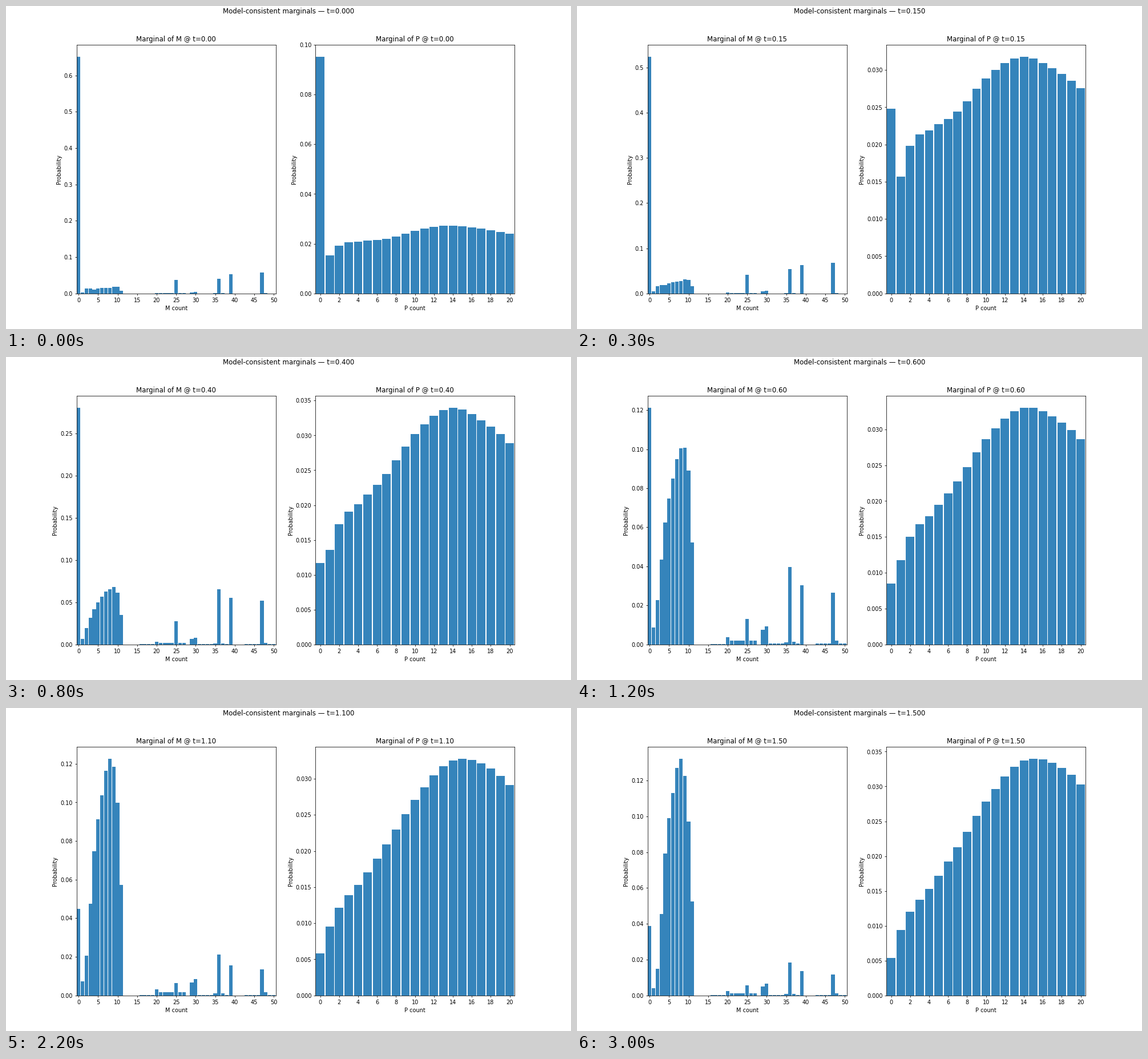
Write a matplotlib script that moves like this. It is 990 px wide and 566 px high and loops after 3100 ms.

```python
import numpy as np
import matplotlib.pyplot as plt
from matplotlib.animation import FuncAnimation

FRAMES, INTERVAL, DT = 31, 100, 0.05

# Time courses, given at a few moments of model time
TIMES = np.array([0, 0.15, 0.4, 0.6, 0.8, 1.1, 1.5])
EMPTY = (0.652, 0.524, 0.2804, 0.1213, 0.0621, 0.045, 0.0388)
SPIKE = (0.0525, 0.0632, 0.0553, 0.0302, 0.0197, 0.0157, 0.0135)
RISE = (0, 0.1, 0.42, 0.71, 0.83, 0.905, 1)
SWELL = (0, 0.25, 0.65, 1, 1, 0.7, 0)
GROWTH = (0.4, 0.57, 0.83, 0.98, 1, 0.89, 0.68)
LEVEL = (1, 1.067, 1, 0.975, 0.955, 0.965, 1)

# Curves over the counts, in 1e-4, given at a few knots
M_KNOTS = (1, 2, 4, 6, 8, 10, 11)
M_EARLY = (35, 133, 112, 158, 147, 190, 79)
M_LATE = (40, 149, 791, 1129, 1322, 971, 525)
P_KNOTS = (1, 2, 4, 7, 10, 14, 17, 20)
P_EARLY = (154, 193, 208, 219, 252, 273, 260, 240)
P_MID = (136, 173, 201, 245, 302, 340, 322, 289)
P_LATE = (94, 120, 153, 213, 278, 337, 334, 303)

# Spike sizes relative to SPIKE: first and settled
SPIKES = {25: (0.7, 0.41), 36: (0.77, 1.36), 39: (1, 1), 47: (1.1, 0.86)}


def smooth(x, knots, values):
    """Cubic Hermite curve through the knots."""
    knots, values = np.asarray(knots, float), np.asarray(values, float)
    h = np.diff(knots)
    d = np.diff(values) / h
    slope = np.empty_like(values)
    slope[1:-1] = (d[:-1] * h[1:] + d[1:] * h[:-1]) / (h[:-1] + h[1:])
    slope[0] = 2 * d[0] - slope[1]
    slope[-1] = 2 * d[-1] - slope[-2]
    i = np.clip(np.searchsorted(knots, x, side="right") - 1, 0, len(h) - 1)
    u = (x - knots[i]) / h[i]
    bend = (1 - u) * (slope[i] - d[i]) - u * (slope[i + 1] - d[i])
    return values[i] + u * h[i] * (d[i] + (1 - u) * bend)


def bump(x, center, width):
    return np.exp(-((x - center) / width) ** 2 / 2)


def mix(a, b, share):
    return a + (b - a) * share


def rare_counts():
    """Peak sizes of the low bars to the right of the hump."""
    rare = np.zeros(51)
    rare[16:20] = 3
    rare[20:28] = 19
    rare[31:39] = 4
    rare[43:51] = 4
    for count, size in {20: 37, 29: 76, 30: 96, 35: 11, 37: 13, 48: 19}.items():
        rare[count] = size
    return rare * 1e-4


HUMP = np.arange(1, 12)
HUMP_EARLY = smooth(HUMP, M_KNOTS, M_EARLY) * 1e-4
HUMP_LATE = smooth(HUMP, M_KNOTS, M_LATE) * 1e-4
HUMP_EDGES = 0.0085 * bump(HUMP, 2.3, 1.2) + 0.015 * bump(HUMP, 10.3, 1.2)
RARE = rare_counts()

P_COUNTS = np.arange(1, 21)
EARLY, MID, LATE = (smooth(P_COUNTS, P_KNOTS, curve) * 1e-4
                    for curve in (P_EARLY, P_MID, P_LATE))


def m_probs(t):
    empty, spike, rise, swell, growth = (
        smooth(t, TIMES, course)
        for course in (EMPTY, SPIKE, RISE, SWELL, GROWTH))
    probs = RARE * growth
    probs[0] = empty
    probs[HUMP] = mix(HUMP_EARLY, HUMP_LATE, rise) + HUMP_EDGES * swell
    fade = np.exp(-(t / 0.37) ** 2)
    for count, (first, settled) in SPIKES.items():
        probs[count] = spike * mix(settled, first, fade)
    return probs


def p_probs(t):
    empty = 0.0052 + 0.024 * np.exp(-3.3 * t) + 0.0661 * np.exp(-17.2 * t)
    if t < 0.4:
        curve = mix(EARLY, MID, t / 0.4)
    else:
        curve = mix(MID, LATE, 1 - max(0, (1.5 - t) / 1.1) ** 2.2)
    return np.append(empty, curve * smooth(t, TIMES, LEVEL))


def make_panel(ax, name, size, tick_step):
    bars = ax.bar(range(size), np.ones(size), width=0.9, alpha=0.9)
    ax.set_xlim(-0.5, size - 0.5)
    ax.set_xticks(range(0, size, tick_step))
    ax.set_xlabel(f"{name} count")
    ax.set_ylabel("Probability")
    return ax, name, bars


def show_panel(panel, probs, t):
    ax, name, bars = panel
    for bar, p in zip(bars, probs):
        bar.set_height(p)
    ax.set_ylim(0, 1.05 * probs.max())
    ax.set_title(f"Marginal of {name} @ t={t:.2f}")


# 990 by 566 pixels
fig, (ax_m, ax_p) = plt.subplots(1, 2, figsize=(14, 8.005), dpi=70.715)
panel_m = make_panel(ax_m, "M", 51, 5)
panel_p = make_panel(ax_p, "P", 21, 2)
heading = fig.suptitle("", y=0.995)


def update(frame):
    t = frame * DT
    heading.set_text(f"Model-consistent marginals — t={t:.3f}")
    show_panel(panel_m, m_probs(t), t)
    show_panel(panel_p, p_probs(t), t)
    return []


anim = FuncAnimation(fig, update, frames=FRAMES, interval=INTERVAL,
                     repeat=True, repeat_delay=0, blit=False)
plt.show()
```
